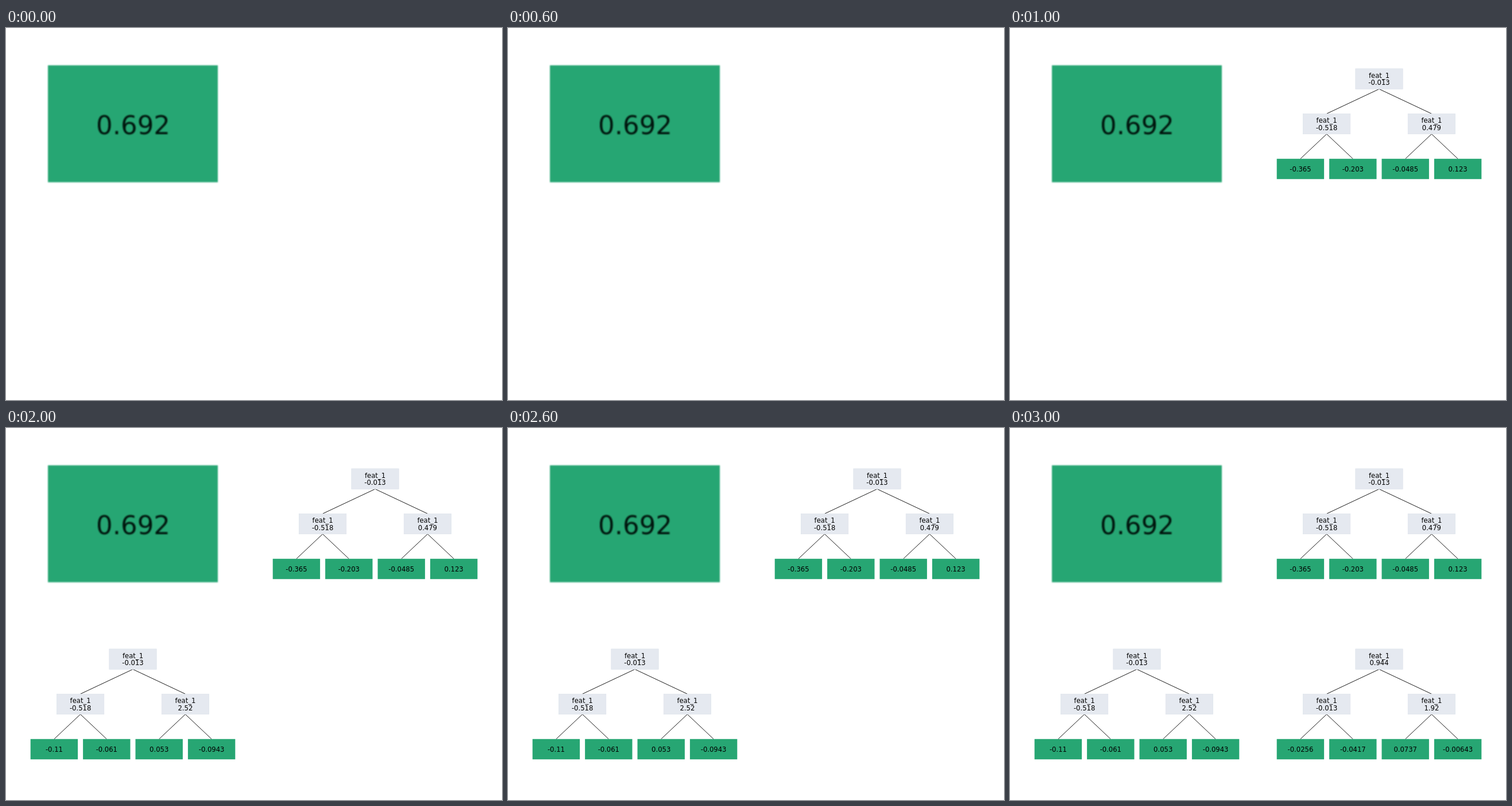
An HTML page that plays this animation: 864x648 px, repeating every 4 s.

```html
<!DOCTYPE html>
<html lang="en">
<head>
<meta charset="utf-8">
<title>Boosted trees</title>
<style>
  html, body { margin: 0; width: 100%; height: 100%; overflow: hidden; background: #fff; }
  svg { display: block; width: 864px; height: 648px; }
  text { font: 11.6px "DejaVu Sans", sans-serif; text-anchor: middle; fill: #000; }
  .big { font-size: 45px; fill: #06140e; }
  .leaf { fill: #27a673; }
  .split { fill: #e5e9f0; stroke: #dbe1e9; stroke-width: .6; }
  .edge { stroke: #1a1a1a; stroke-width: 1; fill: none; }
</style>
</head>
<body>
<svg viewBox="0 0 864 648">
  <defs>
    <filter id="soft" x="-5%" y="-5%" width="110%" height="110%"><feGaussianBlur stdDeviation="1"/></filter>
  </defs>
  <g>
    <rect class="leaf" x="73" y="65" width="296" height="203.7" filter="url(#soft)"/>
    <text class="big" x="221.5" y="184.5" filter="url(#soft)">0.692</text>
  </g>
</svg>
<script>
const LOOP = 4000;
const BOX_W = 82.4, BOX_H = 35.4;
const MID = 91.4, LEAF = 45.7;
const ROWS = [88.6, 167, 245.5];

// splits: root, left, right; leaves: left to right
const trees = [
  { x: 643, y: 0, splits: ["-0.013", "-0.518", "0.479"], leaves: ["-0.365", "-0.203", "-0.0485", "0.123"] },
  { x: 221, y: 314, splits: ["-0.013", "-0.518", "2.52"], leaves: ["-0.11", "-0.061", "0.053", "-0.0943"] },
  { x: 643, y: 314, splits: ["0.944", "-0.013", "1.92"], leaves: ["-0.0256", "-0.0417", "0.0737", "-0.00643"] }
];

const svg = document.querySelector("svg");

function add(parent, tag, attrs, text = "") {
  const el = document.createElementNS("http://www.w3.org/2000/svg", tag);
  for (const key in attrs) el.setAttribute(key, attrs[key]);
  el.textContent = text;
  return parent.appendChild(el);
}

function box(g, kind, x, row) {
  add(g, "rect", { class: kind, x: x - BOX_W / 2, y: ROWS[row] - BOX_H / 2, width: BOX_W, height: BOX_H });
}

function split(g, x, row, value, reach) {
  const top = ROWS[row] + BOX_H / 2, end = ROWS[row + 1] - BOX_H / 2;
  add(g, "path", { class: "edge", d: `M${x - reach} ${end}L${x} ${top}L${x + reach} ${end}` });
  box(g, "split", x, row);
  add(g, "text", { x, y: ROWS[row] - 1.7 }, "feat_1");
  add(g, "text", { x, y: ROWS[row] + 10.8 }, value);
}

function drawTree({ x, y, splits, leaves }) {
  const g = add(svg, "g", { transform: `translate(${x} ${y})` });
  split(g, 0, 0, splits[0], MID);
  split(g, -MID, 1, splits[1], LEAF);
  split(g, MID, 1, splits[2], LEAF);
  leaves.forEach((value, i) => {
    const lx = (2 * i - 3) * LEAF;
    box(g, "leaf", lx, 2);
    add(g, "text", { x: lx, y: ROWS[2] + 4.3 }, value);
  });
  return g;
}

trees.forEach((tree, i) => {
  drawTree(tree).animate([
    { opacity: 0, offset: 0, easing: "step-end" },
    { opacity: 1, offset: (i + 1) / 4 },
    { opacity: 1, offset: 1 }
  ], { duration: LOOP, iterations: Infinity });
});
</script>
</body>
</html>
```
